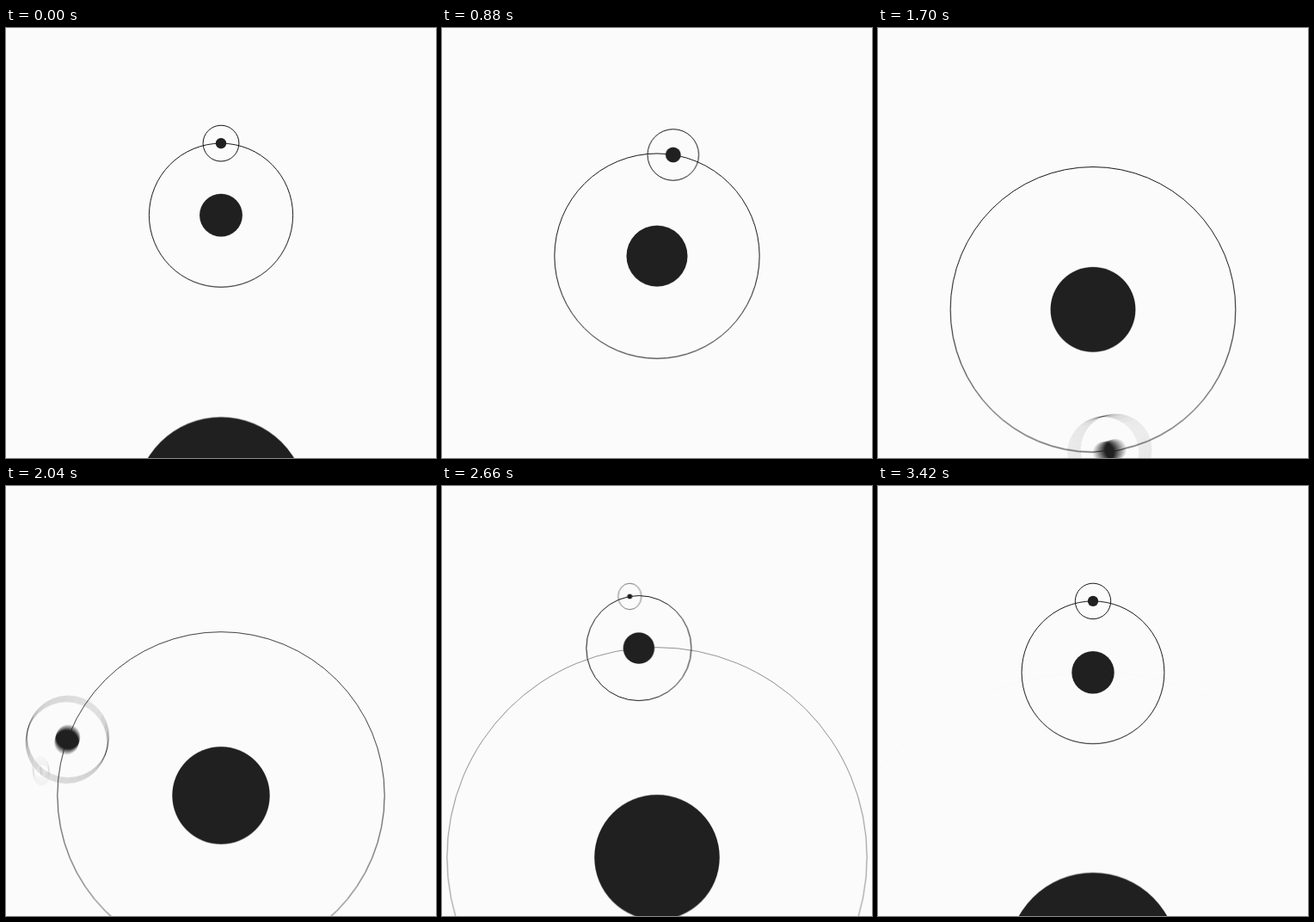
Animation, 500 px wide and 500 px high, one loop 3.44 s. Source, as an HTML page with a canvas:

```html
<!DOCTYPE html>
<html lang="en">
<head>
<meta charset="utf-8">
<title>Endless orbits</title>
<style>
  html, body { margin: 0; width: 100%; height: 100%; overflow: hidden; background: #fbfbfb; }
  canvas { display: block; }
</style>
</head>
<body>
<canvas id="stage" width="500" height="500"></canvas>
<script>
const LOOP = 3440, SHUTTER_OPEN = -1, SHUTTER_CLOSE = 10, SAMPLES = 16;
const SIZE = 500, RATIO = 4;
const START_ORBIT = 83.4, VANISH_Y = 106.25, CORE = 0.298;
const INK = '#202020', PAPER = '#fbfbfb';

const screen = document.getElementById('stage').getContext('2d', { alpha: false });
const layer = document.createElement('canvas');
layer.width = layer.height = SIZE;
const ctx = layer.getContext('2d', { alpha: false });

const easeInOut = (p, power = 4.5) =>
  p < 0.5 ? (2 * p) ** power / 2 : 1 - (2 - 2 * p) ** power / 2;

function disc(x, y, r) {
  ctx.beginPath();
  ctx.arc(x, y, r, 0, 2 * Math.PI);
  ctx.fill();
}

function ring(x, y, r, alpha = 1, squeeze = 1) {
  ctx.globalAlpha = alpha;
  ctx.beginPath();
  ctx.ellipse(x, y, r * squeeze, r, 0, 0, 2 * Math.PI);
  ctx.stroke();
  ctx.globalAlpha = 1;
}

// Angle runs clockwise from the top.
const orbit = (x, y, r, angle) => [x + r * Math.sin(angle), y - r * Math.cos(angle)];

function drawScene(time) {
  const p = (time + LOOP) % LOOP / LOOP;
  const angle = 2 * Math.PI * easeInOut(p);
  const swap = Math.max(0, 2 * p - 1);   // second half: outer ring fades, new moon grows
  const r = START_ORBIT * RATIO ** p;
  const sun = [SIZE / 2, VANISH_Y + r * 4 / 3];
  const planet = orbit(...sun, r, angle);
  const moon = orbit(...planet, r / RATIO, 2 * angle);

  ctx.fillStyle = PAPER;
  ctx.fillRect(0, 0, SIZE, SIZE);
  ctx.fillStyle = ctx.strokeStyle = INK;
  ctx.lineWidth = 1;

  disc(SIZE / 2, VANISH_Y + r * RATIO * 4 / 3, r * RATIO * CORE);

  ring(...sun, r, 1 - swap);
  disc(...sun, r * CORE);

  ring(...planet, r / RATIO);
  disc(...planet, r / RATIO * CORE);

  if (swap > 0) {
    const moonRing = r / RATIO ** 2;
    ring(...moon, moonRing, swap, 0.75 + 0.25 * swap);
    disc(...moon, moonRing * CORE * swap ** 0.8);
  }
}

// Motion blur: running average of scenes across the open shutter.
function render(now) {
  const step = (SHUTTER_CLOSE - SHUTTER_OPEN) / (SAMPLES - 1);
  for (let i = 0; i < SAMPLES; i++) {
    drawScene(now + SHUTTER_OPEN + i * step);
    screen.globalAlpha = 1 / (i + 1);
    screen.drawImage(layer, 0, 0);
  }
  requestAnimationFrame(render);
}
requestAnimationFrame(render);
</script>
</body>
</html>
```
